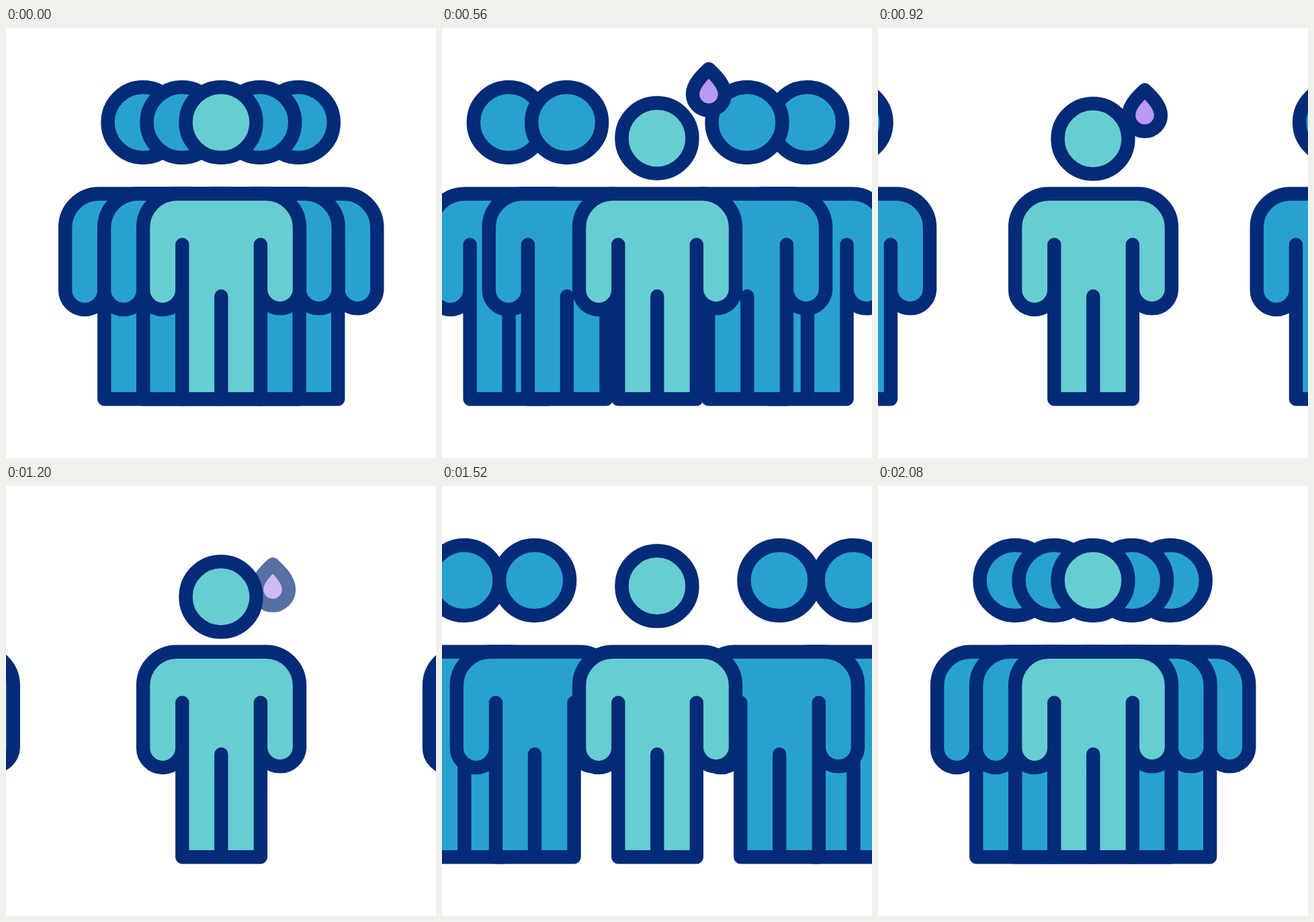
Animation of 640x640 px, one loop 2200 ms. Source, as an HTML page:

```html
<!DOCTYPE html>
<html lang="en">
<head>
<meta charset="utf-8">
<title>Crowd parting</title>
<style>
  html, body { margin: 0; width: 100%; height: 100%; overflow: hidden; background: #fff; }
  svg { display: block; width: 100%; height: 100%; }
  .ink { stroke: #042b77; stroke-width: 20.4; stroke-linecap: round; stroke-linejoin: round; }
  .side { fill: #27a2cf; }
  .main { fill: #66cdd2; }
  .drop { fill: #ba98f3; }
</style>
</head>
<body>
<svg viewBox="0 0 640 640">
  <defs>
    <circle id="head" cx="320" cy="140.5" r="52.5"/>
    <path id="body" d="M262.3 390 A29.1 29.1 0 0 1 204.1 390 V297 A50 50 0 0 1 254.1 246.8
      H387 A50 50 0 0 1 437 297 V390 A29.1 29.1 0 0 1 378.9 390 V552.2 H262.3 Z
      M262.3 322.5 V400 M378.9 322.5 V400 M320.3 399.3 V552"/>
  </defs>
  <g id="crowd" class="ink side"></g>
  <path id="drop" class="ink drop" d="M0 0 C-8 7.5 -24 22 -24 37.5 A24 24 0 0 0 24 37.5 C24 22 8 7.5 0 0 Z"/>
  <g class="ink main">
    <use href="#body"/>
    <use id="face" href="#head"/>
  </g>
</svg>
<script>
const LOOP = 2200, STEP = 40;
const $ = id => document.getElementById(id);
const clamp = u => Math.min(1, Math.max(0, u));
const ramp = (t, from, to) => clamp((t - from) / (to - from));
const smooth = u => u * u * (3 - 2 * u);

// Each row walks out from `start` and is back at `end`, at the given rates.
const far = { start: 120, end: 2040, out: .02628, back: .02878 };
const near = { start: 221, end: 1935, out: .02889, back: .0305 };

function travel(row, t) {
  const out = Math.max(0, t - row.start) * row.out;
  const back = Math.max(0, row.end - t) * row.back;
  return Math.min(out, back) ** 1.9;
}

const people = [
  { row: far, base: -116, reach: -1 },
  { row: far, base: 115.3, reach: 1.035 },
  { row: near, base: -58, reach: -1 },
  { row: near, base: 57.7, reach: 1 }
];

for (const p of people) {
  p.node = document.createElementNS("http://www.w3.org/2000/svg", "g");
  p.node.innerHTML = '<use href="#body"/><use href="#head"/>';
  $("crowd").append(p.node);
}

function draw(t) {
  for (const p of people) {
    const x = p.base + p.reach * travel(p.row, t);
    p.node.setAttribute("transform", `translate(${x.toFixed(2)} 0)`);
  }
  const bow = 24.4 * (smooth(ramp(t, 100, 620)) - smooth(ramp(t, 1205, 1725)));
  $("face").setAttribute("transform", `translate(0 ${bow.toFixed(2)})`);

  const fall = 74.9 + (t - 720) * .0865;
  $("drop").setAttribute("transform", `translate(397 ${fall.toFixed(2)})`);
  $("drop").style.opacity = ramp(t, 380, 500) - ramp(t, 1160, 1280);
}

function tick() {
  const t = performance.now() % LOOP;
  draw(Math.floor(t / STEP) * STEP);
  requestAnimationFrame(tick);
}
tick();
</script>
</body>
</html>
```
